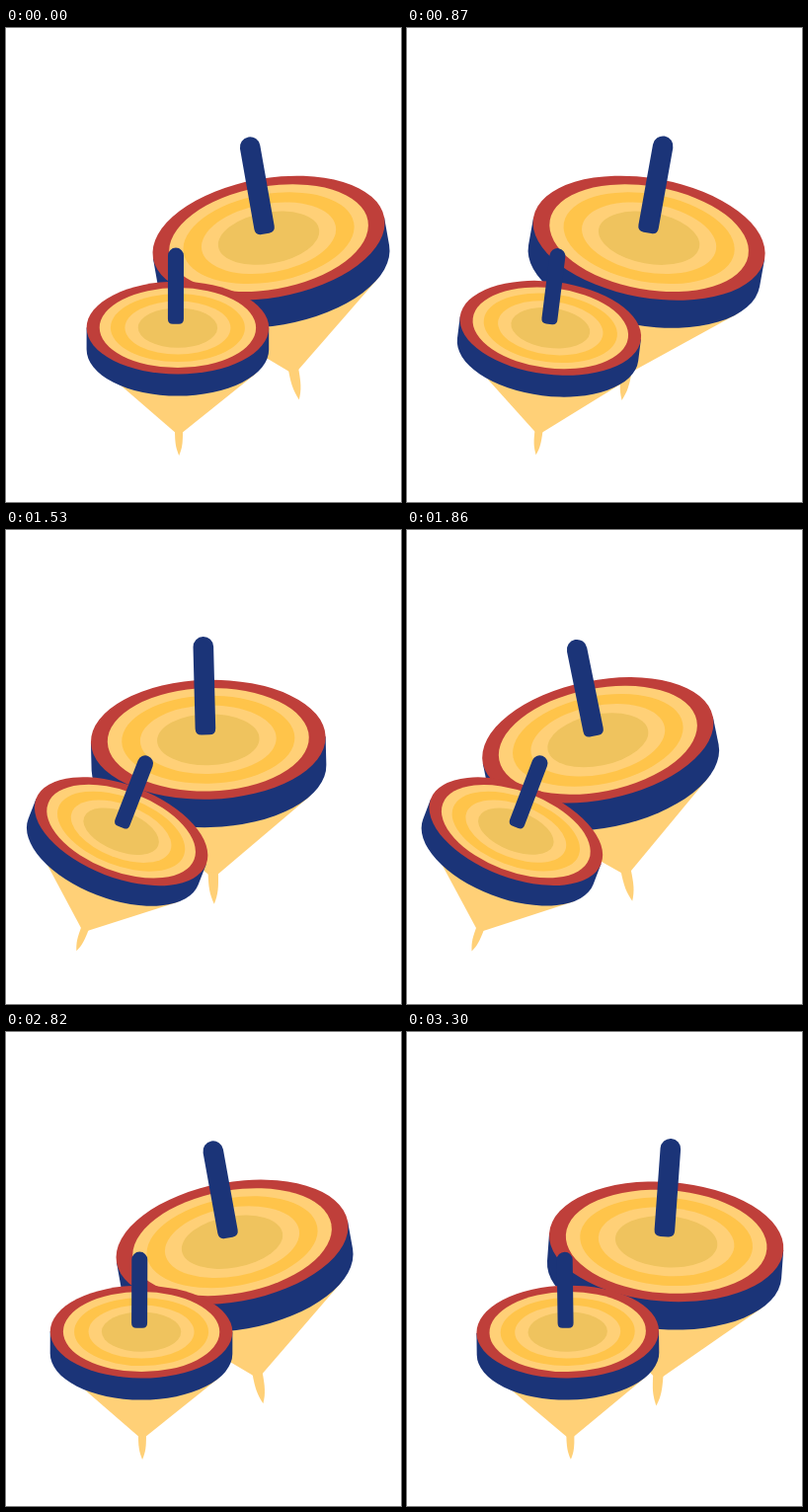
Write an HTML page that moves like this. It is 400 px wide and 480 px high and loops after 3330 ms.

```html
<!DOCTYPE html>
<html lang="en">
<head>
<meta charset="utf-8">
<title>Spinning tops</title>
<style>
  html, body { margin: 0; width: 100%; height: 100%; overflow: hidden; background: #fff; }
  svg { display: block; width: 400px; height: 480px; }
</style>
</head>
<body>
<svg viewBox="0 0 400 480">
  <defs>
    <g id="top">
      <g fill="#ffd077">
        <path d="M-72 22.5 L-2.6 82.5 H5 L80 22 Z"/>
        <path d="M-2.8 81 C-2.7 93 -2 98 1.4 105.8 C4.8 98 5.2 93 5.2 81 Z"/>
      </g>
      <path fill="#1b3478" d="M-92.3 -23.5 V-1.4 A92.3 46.9 0 0 0 92.3 -1.4 V-23.5 Z"/>
      <g transform="translate(0 -23.5)">
        <ellipse rx="92.3" ry="46.9" fill="#bf3f3a"/>
        <ellipse rx="79.2" ry="40.5" fill="#ffd077"/>
        <ellipse rx="68" ry="34.5" fill="#ffc44a"/>
        <ellipse rx="53.5" ry="27" fill="#ffd077"/>
        <ellipse rx="40.2" ry="20.2" fill="#efc35e"/>
      </g>
      <path fill="#1b3478" d="M-10 -96.5 a8 8 0 0 1 16 0 V-32.3 q0 5 -5 5 H-5 q-5 0 -5 -5 Z"/>
    </g>
  </defs>
  <use id="back" href="#top"/>
  <use id="front" href="#top"/>
</svg>
<script>
const LOOP = 3330, STEP = 30;
const SLIDE = 3780, ROCK = 2828;
const front = document.getElementById('front');
const back = document.getElementById('back');

// Cosine swing that peaks at time `peak`
const swing = (t, mid, amp, period, peak) =>
  mid + amp * Math.cos(2 * Math.PI * (t - peak) / period);

function place(el, x, y, tilt, scale) {
  el.setAttribute('transform', `translate(${x} ${y}) rotate(${tilt}) scale(${scale})`);
}

function draw() {
  const t = Math.floor(performance.now() % LOOP / STEP) * STEP;
  const x = swing(t, 137.9, 36, SLIDE, 0);
  place(front, x, 327.1, swing(t, 9.9, -11.9, ROCK, 268), 1);
  place(back, x + 97.4, 242.5, swing(t, -4, -14.2, ROCK, 2318), 1.288);
  requestAnimationFrame(draw);
}
draw();
</script>
</body>
</html>
```
